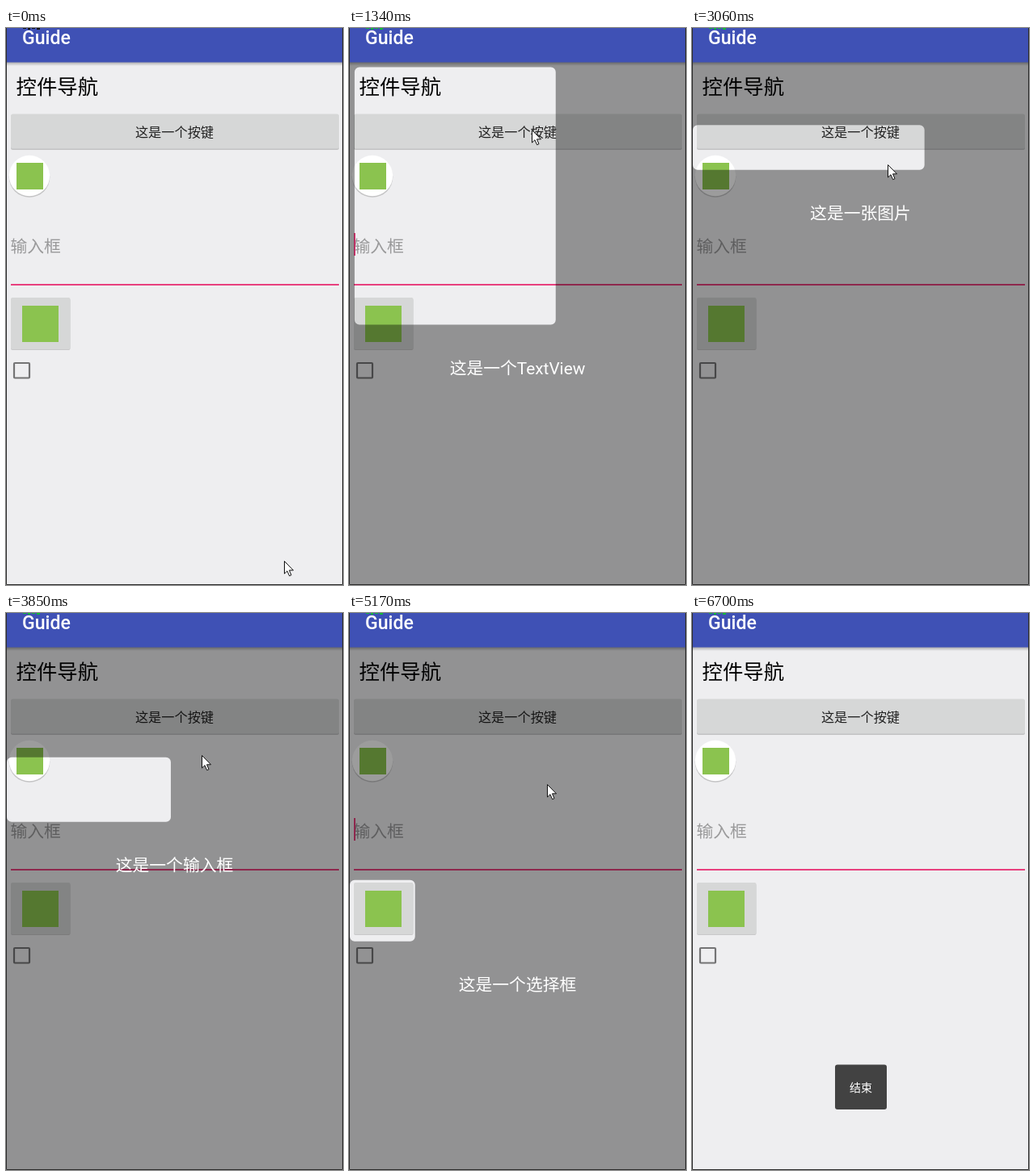
Animation of 417 by 690 pixels, one loop 6.85 s. Source, as an HTML page:

```html
<!DOCTYPE html>
<html lang="zh-CN">
<head>
<meta charset="utf-8">
<title>Guide</title>
<style>
  html, body { margin: 0; width: 100%; height: 100%; overflow: hidden; background: #eeeef0; }
  svg { display: block; width: 417px; height: 690px; }
  text { font-family: Roboto, "Noto Sans CJK SC", "Noto Sans CJK", sans-serif; }
  .mid { text-anchor: middle; }
</style>
</head>
<body>
<svg viewBox="0 0 417 690">
  <defs>
    <linearGradient id="barShadow" x2="0" y2="1">
      <stop stop-color="#000" stop-opacity=".3"/>
      <stop offset="1" stop-color="#000" stop-opacity="0"/>
    </linearGradient>
  </defs>
  <rect width="417" height="690" fill="#eeeef0"/>
  <rect y="42" width="417" height="5" fill="url(#barShadow)"/>

  <text x="12.5" y="82.3" font-size="25.4">控件导航</text>

  <rect x="6" y="107.5" width="406" height="43.5" rx="2.5" fill="#c2c2c3"/>
  <rect x="6" y="106.5" width="406" height="43" rx="2.5" fill="#d6d7d7"/>
  <text class="mid" x="208.5" y="135" font-size="16.2" font-weight="500" fill="#212121">这是一个按键</text>

  <circle cx="29" cy="184.5" r="25.3" fill="#c4c4c5"/>
  <circle cx="29" cy="183" r="25.2" fill="#fff"/>
  <rect x="13" y="167" width="33" height="33" fill="#8bc34f"/>

  <text x="5.5" y="277.5" font-size="20.8" fill="#9a9a9b">输入框</text>
  <rect id="caret" x="6" y="254" width="2" height="28" fill="#e8407e"/>
  <rect x="6" y="317" width="406" height="2" fill="#e8407e"/>

  <rect x="6" y="335" width="73.5" height="64" rx="2" fill="#c8c8c9"/>
  <rect x="6" y="334" width="73.5" height="64" rx="2" fill="#d6d7d7"/>
  <rect x="20" y="344" width="45" height="45" fill="#8bc34f"/>

  <rect x="10" y="415" width="19" height="18.5" rx="1" fill="none" stroke="#747475" stroke-width="2.2"/>

  <g id="guide">
    <path id="dim" fill-opacity=".39" fill-rule="evenodd"/>
    <text id="tip" class="mid" x="208.5" font-size="20.8" fill="#fff"></text>
  </g>

  <rect width="417" height="42.5" fill="#3f51b5"/>
  <path id="counter" d="M21 0h4v1h-4zM27 0h3v2h-3zM32 0h4v1h-4zM38 0h4v2h-4z"/>
  <text x="20" y="20" font-size="23.1" font-weight="500" fill="#fff">Guide</text>

  <g id="toast">
    <rect x="177" y="559.5" width="64" height="55.5" rx="3" fill="#424242"/>
    <text class="mid" x="209" y="593.3" font-size="14" fill="#fff">结束</text>
  </g>

  <path d="M.5 0V689.5H416.5V0" fill="none" stroke="#2b2b2b"/>
  <path id="cursor" d="M.5.5V16L4 12.7 6.6 18.7 9 17.7 6.5 11.8H11.5Z" fill="#fff" stroke="#111"/>
</svg>
<script>
const LOOP = 6850, MOVE = 500;
const $ = id => document.getElementById(id);
const clamp = v => Math.min(1, Math.max(0, v));
const mix = (a, b, p) => a + (b - a) * p;
const ease = p => (1 - Math.cos(Math.PI * clamp(p))) / 2;

// Spotlight boxes: left, top, right, bottom
const SCREEN = [1, 41, 416, 690];
const STEPS = [
  { at: 1079, box: [12, 55, 118, 90], tip: '这是一个TextView' },
  { at: 2105, box: [1, 100.5, 416, 156], tip: '这是一个按钮' },
  { at: 2857, box: [1, 156, 57, 211.5], tip: '这是一张图片' },
  { at: 3630, box: [1, 211.5, 416, 327], tip: '这是一个输入框' },
  { at: 4319, box: [1, 327, 84, 405], tip: '这是一个图片按键' },
  { at: 5100, box: [1, 405, 38, 442], tip: '这是一个选择框' },
  { at: 5945, box: SCREEN, tip: '这是一个选择框' }
];
const GUIDE_SHOWN = 1180, GUIDE_GONE = 5945 + MOVE;

// Pointer path: time, x, y
const POINTER = [
  [50, 344, 660], [440, 152, 112], [640, 222, 124], [860, 226, 126],
  [1500, 226, 126], [1800, 242, 147], [2830, 242, 147], [3050, 242, 169],
  [3650, 242, 169], [4150, 243, 187], [4600, 243, 187], [4860, 243, 208],
  [5100, 243, 208], [5700, 264, 238], [5960, 264, 238], [6450, 356, 700]
];

function pointerAt(t) {
  const next = POINTER.findIndex(p => p[0] > t);
  if (next === 0) return POINTER[0].slice(1);
  if (next < 0) return POINTER.at(-1).slice(1);
  const [t0, x0, y0] = POINTER[next - 1], [t1, x1, y1] = POINTER[next];
  const p = (t - t0) / (t1 - t0);
  return [mix(x0, x1, p), mix(y0, y1, p)];
}

function roundRect([l, t, r, b], q = 6) {
  return `M${l + q} ${t}H${r - q}a${q} ${q} 0 0 1 ${q} ${q}V${b - q}a${q} ${q} 0 0 1 ${-q} ${q}` +
    `H${l + q}a${q} ${q} 0 0 1 ${-q} ${-q}V${t + q}a${q} ${q} 0 0 1 ${q} ${-q}z`;
}

function drawGuide(t) {
  const visible = t >= GUIDE_SHOWN && t < GUIDE_GONE;
  $('guide').style.display = visible ? '' : 'none';
  if (!visible) return;
  const i = STEPS.findLastIndex(s => s.at <= t);
  const from = i ? STEPS[i - 1].box : SCREEN;
  const p = ease((t - STEPS[i].at) / MOVE);
  const box = STEPS[i].box.map((v, k) => mix(from[k], v, p));
  $('dim').setAttribute('d', 'M1 42H416V689H1z' + roundRect(box));
  // The tip sits above its box in the lower half of the screen
  const middle = box[1] > 345 ? box[1] - 53 : box[3] + 53.5;
  $('tip').textContent = STEPS[i].tip;
  $('tip').setAttribute('y', middle + 7.7);
}

function draw(t) {
  drawGuide(t);
  const caretOn = t > 1100 && (t - 100) % 1000 < 500;
  $('caret').style.display = caretOn ? '' : 'none';
  $('toast').style.opacity = clamp((t - 6030) / 300);
  $('counter').setAttribute('fill', t < 860 ? '#111' : '#12b83a');
  $('cursor').setAttribute('transform', `translate(${pointerAt(t).map(Math.round)})`);
}

const start = performance.now();
function tick() {
  draw((performance.now() - start) % LOOP);
  requestAnimationFrame(tick);
}
tick();
</script>
</body>
</html>
```
